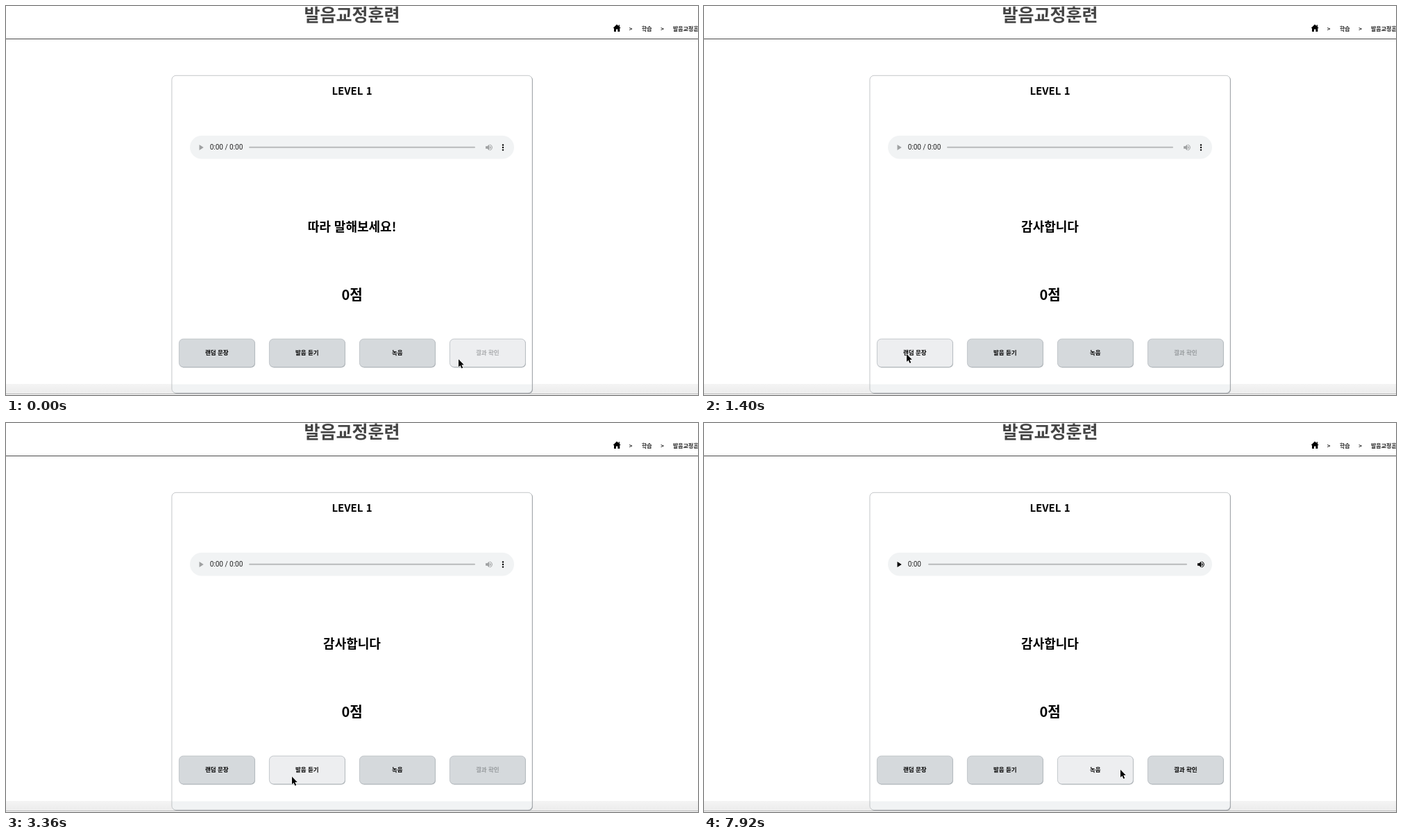
Animation, 997 px wide and 561 px high, one loop 8000 ms. Source, as an HTML page:

```html
<!DOCTYPE html>
<html lang="ko">
<head>
<meta charset="utf-8">
<style>
  html, body { margin: 0; width: 100%; height: 100%; overflow: hidden; background: #fff; }
  svg { display: block; width: 997px; height: 561px; }
  text { font-family: "Noto Sans CJK KR", "Noto Sans CJK", "Noto Sans KR", sans-serif; font-weight: 700; fill: #000; }
  .mid { text-anchor: middle; }
  .crumb { font-size: 8px; fill: #222; }
  .time { font: 400 10px Roboto, sans-serif; fill: #222; }
  .label { font-size: 8.5px; }
</style>
</head>
<body>
<svg viewBox="0 0 997 561">
  <defs>
    <linearGradient id="band" x1="0" y1="0" x2="0" y2="1">
      <stop offset="0" stop-color="#f4f4f4"/>
      <stop offset="1" stop-color="#ececec"/>
    </linearGradient>
    <clipPath id="cardClip"><rect x="239" y="100" width="519" height="458" rx="6"/></clipPath>
  </defs>

  <text class="mid" x="498.5" y="21.5" font-size="25" style="fill:#444">발음교정훈련</text>
  <path d="M880 26.5 L874.5 32 H876 V37 H879 V33.5 H881.3 V37 H884.3 V32 H885.8 L884 30.2 V27.3 H882.7 V29Z"/>
  <text class="crumb mid" x="900" y="36">&gt;</text>
  <text class="crumb" x="916" y="36">학습</text>
  <text class="crumb mid" x="945.5" y="36">&gt;</text>
  <text class="crumb" x="961" y="36">발음교정훈련</text>
  <rect y="47" width="997" height="1" fill="#4a4a4a"/>

  <rect y="545" width="997" height="14" fill="url(#band)"/>
  <rect y="559" width="997" height="1" fill="#b4b4b4"/>

  <rect x="240" y="101" width="519" height="458" rx="6" fill="#92979b"/>
  <rect x="239" y="100" width="519" height="458" rx="6" fill="#fff"/>
  <rect x="239" y="545.5" width="519" height="13" fill="#f1f3f4" clip-path="url(#cardClip)"/>
  <rect x="238.9" y="100.3" width="519.3" height="457.9" rx="6" fill="none" stroke="#b5b9bc" stroke-width=".8"/>

  <text class="mid" x="498.5" y="127.5" font-size="15">LEVEL 1</text>

  <rect x="265" y="187" width="467" height="33.5" rx="16.75" fill="#f1f3f4"/>
  <path id="play" d="M278.5 200 V208 L284.7 204Z"/>
  <text id="time" class="time" x="293.7" y="206.6"></text>
  <rect id="track" y="202.8" height="2" rx="1" fill="#b9bbbc"/>
  <g id="volume">
    <path d="M-5 -1.7 H-2.5 L.3 -4.5 V4.5 L-2.5 1.7 H-5Z"/>
    <path d="M1.2 -2.3 A2.5 2.5 0 0 1 1.2 2.3Z"/>
    <path d="M1.2 -4 A4.1 4.1 0 0 1 1.2 4" fill="none" stroke="currentColor"/>
  </g>
  <g id="dots">
    <circle cx="716" cy="200.4" r="1.2"/><circle cx="716" cy="204" r="1.2"/><circle cx="716" cy="207.6" r="1.2"/>
  </g>

  <text id="phrase" class="mid" x="498.5" y="325" font-size="18"></text>
  <text class="mid" x="498.5" y="424" font-size="20">0점</text>

  <g id="buttons"></g>
  <path id="cursor" d="M0 0 V11 L2.5 8.7 L4.4 13 L6.2 12.2 L4.3 8 H7.7Z" stroke="#fff" stroke-width=".8" paint-order="stroke"/>
</svg>
<script>
const LOOP = 8000, STEP = 40;
const $ = id => document.getElementById(id);

// time, x, y of the pointer tip
const path = [
  [480, 652, 509.5], [520, 642, 509], [560, 614, 508], [600, 574, 507],
  [640, 520, 510], [680, 465, 514], [720, 415, 518], [760, 372, 517],
  [800, 340, 513], [840, 318, 508], [880, 304, 504], [920, 296, 502.5], [960, 292, 502],
  [1640, 292, 502], [1760, 309, 503], [1880, 362, 506], [2000, 404, 509], [2080, 412, 510],
  [5560, 412, 510], [5640, 440, 509], [5720, 520, 505], [5800, 580, 502], [5880, 600, 500]
];

function pointer(t) {
  const i = path.findIndex(p => p[0] > t);
  if (i === 0) return path[0].slice(1);
  if (i < 0) return path[path.length - 1].slice(1);
  const a = path[i - 1], b = path[i], k = (t - a[0]) / (b[0] - a[0]);
  return [a[1] + (b[1] - a[1]) * k, a[2] + (b[2] - a[2]) * k];
}

function svg(tag, attrs, parent) {
  const el = document.createElementNS("http://www.w3.org/2000/svg", tag);
  for (const key in attrs) el.setAttribute(key, attrs[key]);
  return parent.appendChild(el);
}

const buttons = ["랜덤 문장", "발음 듣기", "녹음", "결과 확인"].map((name, i) => {
  const x = 249 + i * 130, box = { width: 109, height: 40.5, rx: 6 };
  svg("rect", { ...box, x: x + 1, y: 481, fill: "#a4aaae" }, $("buttons"));
  const face = svg("rect", { ...box, x: x + .4, y: 480.2, stroke: "#b7bcc0", "stroke-width": .8 }, $("buttons"));
  const label = svg("text", { class: "label mid", x: x + 54.8, y: 503.2 }, $("buttons"));
  label.textContent = name;
  return { x, face, label };
});

function draw(t) {
  const [px, py] = pointer(t);
  const ready = t >= 7920, recording = t >= 6200 && !ready;

  $("cursor").setAttribute("transform", `translate(${px} ${py})`);
  $("phrase").textContent = t < 1400 ? "따라 말해보세요!" : "감사합니다";

  buttons.forEach((b, i) => {
    const over = px >= b.x && px < b.x + 110 && py >= 480 && py < 522;
    const off = i === 3 && !ready;
    b.face.setAttribute("fill", over ? "#edeef0" : "#d5d9dc");
    b.label.style.fill = off ? (over ? "#a9abad" : "#979b9e") : "#000";
  });
  buttons[2].label.textContent = recording ? "중지" : "녹음";

  const ink = ready ? "#000" : "#9fa1a2";
  $("play").setAttribute("fill", ink);
  $("time").textContent = ready ? "0:00" : "0:00 / 0:00";
  $("track").setAttribute("x", ready ? 323 : 350);
  $("track").setAttribute("width", ready ? 373 : 326);
  $("volume").setAttribute("transform", `translate(${ready ? 716 : 696} 204)`);
  $("volume").setAttribute("fill", ink);
  $("volume").style.color = ink;
  $("dots").style.display = ready ? "none" : "";
}

const start = performance.now();
function tick(now) {
  const t = Math.max(0, now - start) % LOOP;
  draw(Math.floor(t / STEP) * STEP);
  requestAnimationFrame(tick);
}
draw(0);
requestAnimationFrame(tick);
</script>
</body>
</html>
```
